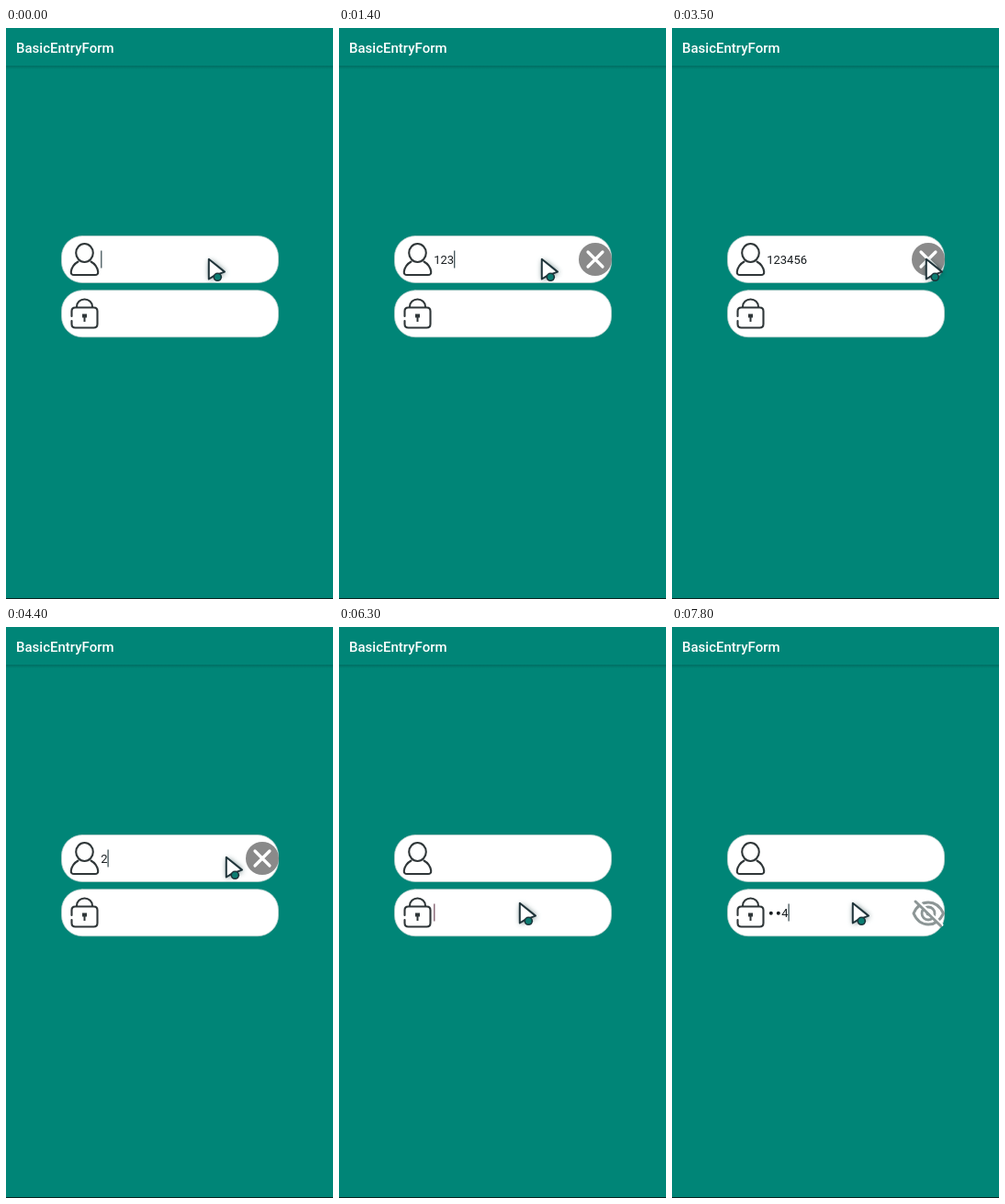
An HTML page with a canvas that plays this animation: 356 px wide and 622 px high, repeating every 8 s.

```html
<!DOCTYPE html>
<html lang="en">
<head>
<meta charset="utf-8">
<title>Form</title>
<style>
  html, body { margin: 0; width: 100%; height: 100%; overflow: hidden; background: #008577; }
  canvas { display: block; }
</style>
</head>
<body>
<canvas id="stage" width="356" height="622"></canvas>
<script>
const ctx = document.getElementById('stage').getContext('2d');
const LOOP = 8000, STEP = 100, BLINK = 500;
const INK = '#2f3638', GREY = '#8a8a8a', TEXT = '#171c1f', TEXT_X = 103.2;

// time, user text, password text, focused field
const states = [
  [0, '', '', 0], [800, '1', '', 0], [1100, '12', '', 0], [1400, '123', '', 0],
  [1800, '1234', '', 0], [2200, '12345', '', 0], [2600, '123456', '', 0],
  [3600, '', '', 0], [4400, '2', '', 0], [5400, '', '', 0], [6200, '', '', 1],
  [6900, '', '2', 1], [7400, '', '23', 1], [7800, '', '234', 1]
];

// time, x, y of the pointer tip
const pointerPath = [
  [0, 220, 251], [3100, 220, 251], [3500, 276, 251], [3600, 276, 251],
  [3900, 239, 250], [4900, 239, 250], [5300, 276, 251], [5500, 275, 251],
  [5800, 196, 300], [LOOP, 196, 300]
];

function pointerAt(t) {
  const i = pointerPath.findIndex(p => p[0] > t);
  const [t0, x0, y0] = pointerPath[i - 1], [t1, x1, y1] = pointerPath[i];
  const k = (t - t0) / (t1 - t0), e = k * k * (3 - 2 * k);
  return [x0 + (x1 - x0) * e, y0 + (y1 - y0) * e];
}

function shape(d, stroke, width, fill) {
  const path = new Path2D(d);
  if (fill) { ctx.fillStyle = fill; ctx.fill(path); }
  if (stroke) { ctx.strokeStyle = stroke; ctx.lineWidth = width; ctx.stroke(path); }
}

function disc(x, y, r, color) {
  ctx.fillStyle = color;
  ctx.beginPath();
  ctx.arc(x, y, r, 0, 7);
  ctx.fill();
}

function label(text, x, y, font, color) {
  ctx.font = font + ' Roboto, sans-serif';
  ctx.fillStyle = color;
  ctx.fillText(text, x, y);
  return x + ctx.measureText(text).width;
}

function field(y) {
  ctx.beginPath();
  ctx.roundRect(60.5, y, 236, 51, 22.5);
  ctx.fillStyle = '#fff';
  ctx.fill();
  ctx.strokeStyle = '#b4cdca';
  ctx.lineWidth = 0.8;
  ctx.stroke();
}

function userIcon() {
  ctx.beginPath();
  ctx.ellipse(85.5, 245, 9.3, 10, 0, 0, 7);
  ctx.strokeStyle = INK;
  ctx.lineWidth = 2.1;
  ctx.stroke();
  shape('M78.5 254.500C74 257 71.500 261 70.800 265.500Q70.500 269 74 269H97Q100.500 269 100.200 265.500C99.500 261 97 257 92.500 254.500', INK, 2.1);
}

function lockIcon() {
  shape('M77 304v-.5a8.500 8 0 0 1 17 0v.5', INK, 2.1);
  shape('M71.500 314v-5.500q0-4 4-4h20q4 0 4 4v14q0 4-4 4h-20q-4 0-4-4v-3.500', INK, 2.1);
  shape('M83 311.500h5v4h-1.500v4.500h-2v-4.500h-1.500Z', null, 0, INK);
}

function clearButton() {
  disc(279, 252, 18, GREY);
  shape('M271 244l16 16m0-16l-16 16', '#fff', 3.2);
}

function hiddenEye() {
  const grey = '#8d9696';
  ctx.save();
  ctx.beginPath();
  ctx.rect(260, 290, 37, 46);
  ctx.clip();
  shape('M263 312C270 296 288 296 295.5 312C288 328 270 328 263 312Z', grey, 3);
  shape('M286 312a7 7 0 1 1-14 0a7 7 0 1 1 14 0', grey, 2.8);
  disc(279, 312, 2.5, grey);
  shape('M267 297.5l27 27', '#fff', 3);
  shape('M265 299l27.5 26.5', grey, 3);
  ctx.restore();
}

function pointer(x, y) {
  const arrow = 'M.8 .8V22.5L7 18.6L18 14.6Z';
  ctx.save();
  ctx.translate(x, y);
  ctx.shadowColor = 'rgba(0,40,42,.75)';
  ctx.shadowBlur = 6;
  ctx.shadowOffsetX = ctx.shadowOffsetY = 1;
  shape(arrow, null, 0, '#fff');
  ctx.shadowColor = 'transparent';
  shape(arrow, '#20343a', 2);
  disc(10.3, 20.3, 4.8, '#1c3439');
  disc(10.3, 20.3, 3.2, '#0c7d72');
  ctx.restore();
}

function background() {
  ctx.fillStyle = '#008577';
  ctx.fillRect(0, 0, 356, 622);
  const shade = ctx.createLinearGradient(0, 41, 0, 45);
  shade.addColorStop(0, 'rgba(0,40,36,.25)');
  shade.addColorStop(1, 'rgba(0,40,36,0)');
  ctx.fillStyle = shade;
  ctx.fillRect(0, 41, 356, 4);
  ctx.fillStyle = '#06211e';
  ctx.fillRect(0, 621, 356, 1);
  label('BasicEntryForm', 11, 26.5, '500 15px', '#fff');
}

function draw(now) {
  const t = Math.floor(now % LOOP / STEP) * STEP;
  const [since, user, pass, focus] = states.findLast(s => s[0] <= t);

  ctx.lineCap = ctx.lineJoin = 'round';
  background();
  field(226.5);
  field(285.7);
  userIcon();
  lockIcon();

  let caretX = TEXT_X;
  if (user) {
    caretX = label(user, TEXT_X, 257, '13px', TEXT);
    clearButton();
  }
  if (pass) {
    const masked = pass.length - 1;
    for (let i = 0; i < masked; i++) disc(107.8 + 8 * i, 311.7, 2, TEXT);
    caretX = label(pass.at(-1), TEXT_X + 8 * masked, 316.3, '13px', TEXT);
    hiddenEye();
  }
  if ((t - since) % (2 * BLINK) < BLINK) {
    ctx.fillStyle = focus && !pass ? '#744b5c' : '#34474c';
    ctx.fillRect(caretX, focus ? 301.5 : 242.5, 1.2, 19);
  }
  pointer(...pointerAt(t));
  requestAnimationFrame(() => draw(performance.now()));
}

draw(0);
</script>
</body>
</html>
```
